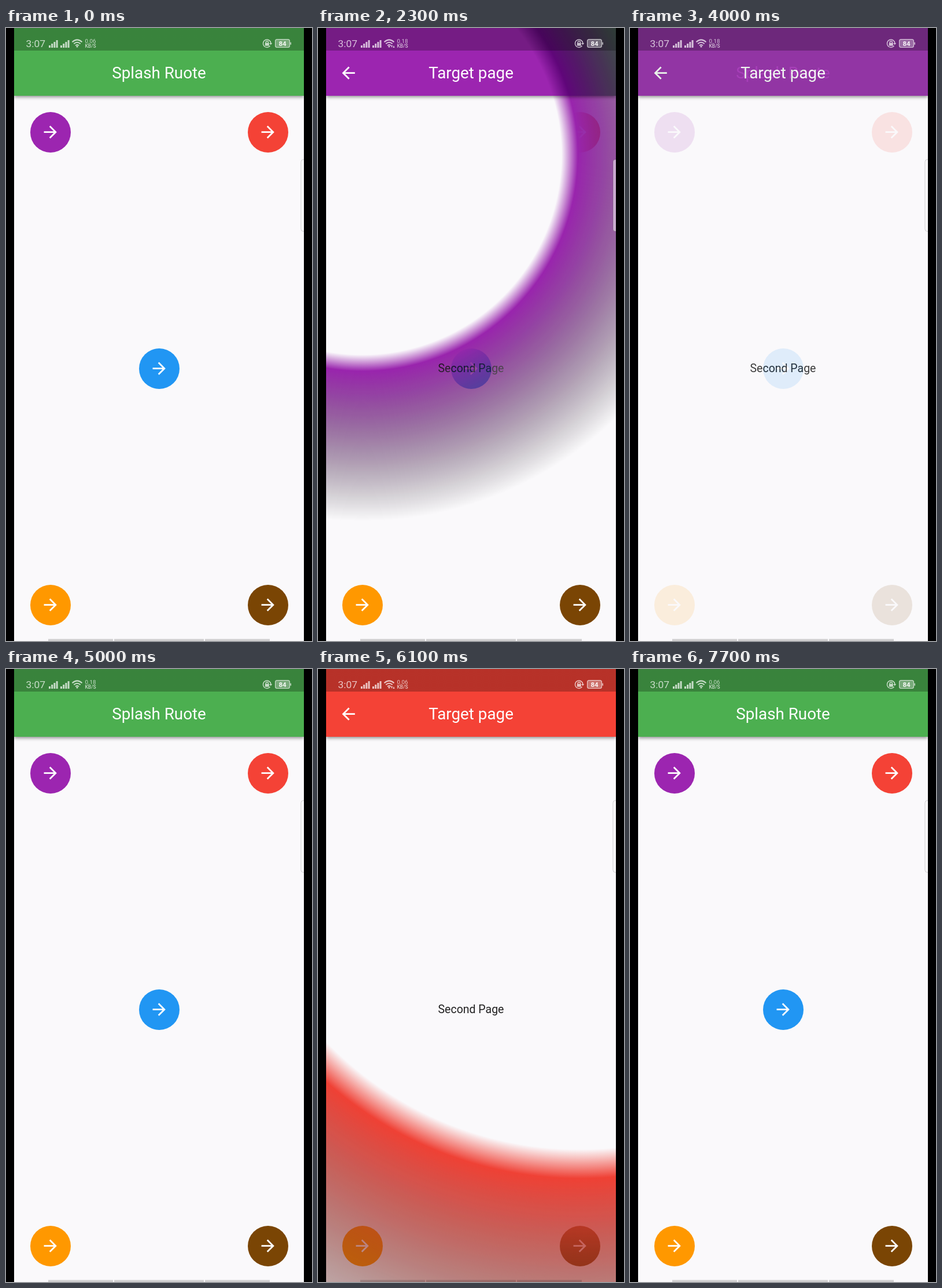
These frames come from a looping animation (529 by 1058 pixels, 8 s). An HTML page:

```html
<!DOCTYPE html>
<html lang="en">
<head>
<meta charset="utf-8">
<title>Splash Ruote</title>
<style>
  @property --r { syntax: "<length>"; inherits: true; initial-value: 0px; }

  html, body { margin: 0; width: 100%; height: 100%; overflow: hidden; background: #000; }
  .stage { position: relative; width: 529px; height: 1058px; overflow: hidden; font-family: Roboto, Arial, sans-serif; }
  .phone { position: absolute; left: 14px; top: 0; width: 501px; height: 1058px; overflow: hidden; }
  .page { position: absolute; inset: 0; background: #faf9fb; overflow: hidden; }

  .bar {
    position: absolute; left: 0; top: 0; width: 501px; height: 117px;
    background: linear-gradient(#00000040 39px, transparent 39px), var(--c);
    box-shadow: 0 2px 6px #00000075;
    color: #fff; font-size: 27.8px; line-height: 78px; text-align: center;
  }
  .bar span { position: absolute; left: 0; right: 0; top: 39px; }
  .icon { position: absolute; width: 33.4px; height: 33.4px; fill: #fff; }
  .bar .icon { left: 22.3px; top: 61.3px; }

  .fab {
    position: absolute; left: var(--x); top: var(--y); width: 70px; height: 70px;
    margin: -35px; border-radius: 50%; background: var(--c); overflow: hidden;
  }
  .fab .icon { left: 18.3px; top: 18.3px; }
  .ink {
    position: absolute; inset: 0; border-radius: 50%; background: #fff; opacity: 0;
    animation: ink 8s linear var(--tap) infinite;
  }

  /* The page is multiplied by white > colour > black while its alpha falls off outside the ring. */
  .target {
    --at: circle at var(--x) 219.5px;
    -webkit-mask-image: radial-gradient(var(--at), #000 calc(var(--r) * .59), transparent var(--r));
    mask-image: radial-gradient(var(--at), #000 calc(var(--r) * .59), transparent var(--r));
    animation: open 8s linear var(--open) infinite, fade 8s linear var(--close) infinite;
  }
  .target::after {
    content: ""; position: absolute; inset: 0; mix-blend-mode: multiply;
    background: radial-gradient(var(--at), #fff calc(var(--r) * .545), var(--c) calc(var(--r) * .59), #000 var(--r));
  }
  .body {
    position: absolute; left: 0; right: 0; top: 568px; line-height: 40px;
    text-align: center; font-size: 19.5px; color: #000000de;
  }
  .purple { --c: #9c25b0; --x: 62.5px; --open: -6069ms; --close: -4050ms; --tap: -6400ms; }
  .red { --c: #f44236; --x: 438.5px; --open: -2554ms; --close: -750ms; --tap: -2600ms; }

  .system { position: absolute; inset: 0; }
  .system text { font-family: Roboto, Arial, sans-serif; }
  .slow { animation: slow 8s step-end infinite; }
  .fast { animation: fast 8s step-end infinite; }
  .traffic { animation: traffic 8s step-end infinite; }

  @keyframes open {
    0% { --r: 0px; }
    12.74%, 40% { --r: 1740px; }
    40.01%, 100% { --r: 0px; }
  }
  @keyframes fade {
    0% { opacity: 1; }
    5.375%, 50% { opacity: 0; }
    50.01%, 100% { opacity: 1; }
  }
  @keyframes ink {
    0% { opacity: .18; transform: scale(.3); }
    3% { opacity: .18; transform: scale(1); }
    6%, 100% { opacity: 0; transform: scale(1); }
  }
  @keyframes slow { 0% { opacity: 1; } 23.75% { opacity: 0; } 67.5%, 100% { opacity: 1; } }
  @keyframes fast { 0% { opacity: 0; } 23.75% { opacity: 1; } 67.5%, 100% { opacity: 0; } }
  @keyframes traffic {
    0% { opacity: 0; }
    8.75% { opacity: 1; }
    12.5% { opacity: 0; }
    20% { opacity: 1; }
    40% { opacity: 0; }
    67.5% { opacity: 1; }
    83.75%, 100% { opacity: 0; }
  }
</style>
</head>
<body>
<svg width="0" height="0" style="position:absolute">
  <symbol id="next" viewBox="0 0 24 24"><path d="M12 4l-1.41 1.41L16.17 11H4v2h12.17l-5.58 5.59L12 20l8-8z"/></symbol>
  <symbol id="back" viewBox="0 0 24 24"><path d="M20 11H7.83l5.59-5.59L12 4l-8 8 8 8 1.41-1.41L7.83 13H20z"/></symbol>
  <symbol id="signal" viewBox="0 0 16 14" width="16" height="14">
    <path d="M0 10h3v4H0zM4.2 7h3v7h-3zM8.4 4h3v10h-3zM12.6 1h3v13h-3z"/>
  </symbol>
</svg>

<div class="stage">
  <div class="phone">
    <div class="page">
      <div class="bar" style="--c:#4caf50"><span>Splash Ruote</span></div>
      <div class="fab purple" style="--y:179.5px"><i class="ink"></i><svg class="icon"><use href="#next"/></svg></div>
      <div class="fab red" style="--y:179.5px"><i class="ink"></i><svg class="icon"><use href="#next"/></svg></div>
      <div class="fab" style="--c:#2196f3;--x:250.5px;--y:587.5px"><svg class="icon"><use href="#next"/></svg></div>
      <div class="fab" style="--c:#ff9800;--x:62.5px;--y:995.5px"><svg class="icon"><use href="#next"/></svg></div>
      <div class="fab" style="--c:#7a4504;--x:438.5px;--y:995.5px"><svg class="icon"><use href="#next"/></svg></div>
    </div>
    <div class="page target purple">
      <div class="bar"><svg class="icon"><use href="#back"/></svg><span>Target page</span></div>
      <div class="body">Second Page</div>
    </div>
    <div class="page target red">
      <div class="bar"><svg class="icon"><use href="#back"/></svg><span>Target page</span></div>
      <div class="body">Second Page</div>
    </div>
  </div>

  <svg class="system" width="529" height="1058">
    <g fill="#fff" opacity=".72">
      <text x="34.5" y="33" font-size="17.4">3:07</text>
      <use href="#signal" x="74" y="20"/>
      <use href="#signal" x="94" y="20"/>
      <g fill="none" stroke="#fff" stroke-width="2">
        <path d="M114.5 24.2q8.5-7.6 17 0M117.3 27.3q5.7-5 11.4 0M120 30.3q3-2.5 6 0"/>
      </g>
      <circle cx="123" cy="32" r="1.6"/>
      <path class="traffic" d="M126 30h3.200l-1.600 4zM129.400 34h3.200l-1.600-4z"/>
      <g font-size="9.8">
        <text class="slow" x="136.500" y="26">0.06</text>
        <text class="fast" x="136.500" y="26">0.18</text>
      </g>
      <text x="136.500" y="34.300" font-size="8.500" font-weight="500">KB/S</text>
      <g fill="none" stroke="#fff" stroke-width="1.500">
        <path d="M456.500 30.800a6.700 6.700 0 1 1 1.300-4.800M449.300 26v-1.500a2 2 0 0 1 4 0V26"/>
      </g>
      <path d="M447.800 25.700h7v5h-7zM455.200 26h5l-2.500 3.200z"/>
      <rect x="465.600" y="19.700" width="24.800" height="13.800" rx="3" fill="#ffffff70" stroke="#fff" stroke-width="1.200"/>
      <rect x="491.500" y="24.500" width="1.500" height="4.500" rx=".7"/>
    </g>
    <text x="478" y="30.800" font-size="11.500" font-weight="700" fill="#fff" fill-opacity=".9" text-anchor="middle">84</text>
    <path d="M516 227h-2q-4 0-4 4v116q0 4 4 4h2z" fill="#fff" fill-opacity=".5" stroke="#000" stroke-opacity=".18"/>
    <path d="M515 0h14v1058h-14z"/>
    <path d="M73 1054.500h112v4H73zM187 1054.500h155v4H187zM344 1054.500h112v4H344z" fill-opacity=".17"/>
  </svg>
</div>
</body>
</html>
```
